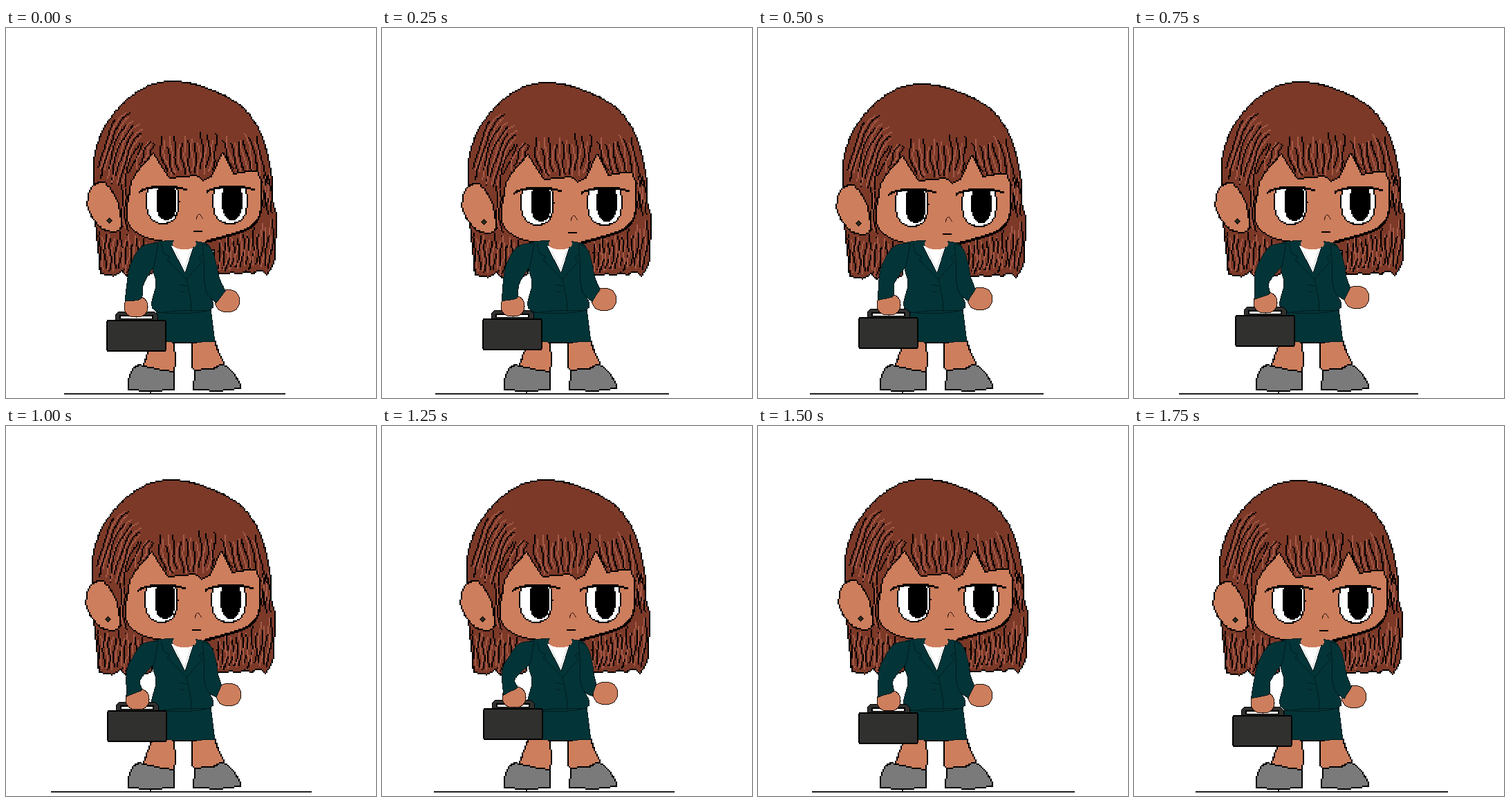
Recreate the animation shown at these times as an HTML page with a canvas. Size 535 by 535 pixels, loop 2 s.

```html
<!DOCTYPE html>
<html lang="en">
<head>
<meta charset="utf-8">
<title>Office walk</title>
<style>
  html, body { margin: 0; width: 100%; height: 100%; overflow: hidden; background: #fff; }
  canvas { display: block; width: 100vw; height: 100vh; image-rendering: pixelated; }
</style>
</head>
<body>
<canvas id="stage" width="535" height="535"></canvas>
<script>
const SIZE = 535, STEP = 250, STEPS = 8, PEAK = 5;
const SKIN = '#cd7e5d', HAIR = '#7c3928', SHINE = '#a65a48', SUIT = '#033437', SEAM = '#011c1f',
      SHOE = '#7a7a7a', BAG = '#30302f', INK = '#000', KNUCKLE = '#1c0d07';
const FLOOR_LEFT = [84, 77, 75, 65, 65, 75, 78, 89];
const FLOOR_RIGHT = [404, 415, 413, 411, 442, 423, 458, 454];

const stage = document.getElementById('stage').getContext('2d');
let g = stage, cell = 1;

const lerp = (a, b, t) => a + (b - a) * t;
const shift = (pts, [dx, dy]) => pts.map(([x, y]) => [x + dx, y + dy]);

let seed = 7;
function random() {
  seed = (seed * 16807) % 2147483647;
  return seed / 2147483647;
}

function pairs(flat) {
  const out = [];
  for (let i = 0; i < flat.length; i += 2) out.push([flat[i], flat[i + 1]]);
  return out;
}

// Catmull-Rom curve through the points
function curve(flat, closed = false) {
  const p = pairs(flat), n = p.length, out = [];
  const at = i => closed ? p[(i + n) % n] : p[Math.max(0, Math.min(n - 1, i))];
  for (let i = 0; i < (closed ? n : n - 1); i++) {
    const [a, b, c, d] = [at(i - 1), at(i), at(i + 1), at(i + 2)];
    for (let t = 0; t < 1; t += 0.125) {
      out.push([0, 1].map(k => b[k] + 0.5 * t * (c[k] - a[k] +
        t * (2 * a[k] - 5 * b[k] + 4 * c[k] - d[k] + t * (3 * (b[k] - c[k]) + d[k] - a[k])))));
    }
  }
  if (!closed) out.push(p[n - 1]);
  return out;
}

// Rounded blob, optionally cut flat at the top
function blob(cx, cy, rx, ry, top = 0) {
  const bulge = v => Math.sign(v) * Math.abs(v) ** 0.85;
  return Array.from({ length: 32 }, (_, i) => {
    const a = i * Math.PI / 16;
    return [cx + rx * bulge(Math.cos(a)), Math.max(top, cy + ry * bulge(Math.sin(a)))];
  });
}

// Hard-edged polygon fill, row by row
function fill(pts, color) {
  g.fillStyle = color;
  for (let y = 0; y * cell < SIZE; y++) {
    const row = (y + 0.5) * cell, hits = [];
    pts.forEach(([x1, y1], i) => {
      const [x2, y2] = pts[(i + 1) % pts.length];
      if ((y1 <= row) !== (y2 <= row)) hits.push(x1 + (row - y1) / (y2 - y1) * (x2 - x1));
    });
    hits.sort((a, b) => a - b);
    for (let i = 0; i + 1 < hits.length; i += 2) {
      const a = Math.round(hits[i] / cell), b = Math.round(hits[i + 1] / cell);
      g.fillRect(a * cell, y * cell, (b - a) * cell, cell);
    }
  }
}

function line(pts, color = INK, closed = false, thick = 1) {
  g.fillStyle = color;
  const n = pts.length;
  for (let i = 0; i < (closed ? n : n - 1); i++) {
    const [x1, y1] = pts[i], [x2, y2] = pts[(i + 1) % n];
    const count = Math.max(1, Math.ceil(Math.max(Math.abs(x2 - x1), Math.abs(y2 - y1)) / cell));
    for (let k = 0; k <= count; k++) {
      const x = Math.floor(lerp(x1, x2, k / count) / cell);
      const y = Math.floor(lerp(y1, y2, k / count) / cell);
      g.fillRect(x * cell, y * cell, cell, cell * thick);
    }
  }
}

function shape(pts, color, edge = INK) {
  fill(pts, color);
  line(pts, edge, true);
}

// Ragged hair ends between two x positions
function ragged(x1, x2, y) {
  const n = Math.round(Math.abs(x2 - x1) / 6);
  return Array.from({ length: n + 1 }, (_, i) => [lerp(x1, x2, i / n), y + (random() - 0.5) * 8]);
}

// Wavy dark and light strands spread between two guide strands
function strands(n, first, last) {
  const from = pairs(first), to = pairs(last);
  for (let i = 0; i <= 2 * n; i++) {
    const u = i / (2 * n);
    const [a, m, b] = from.map((p, k) => [lerp(p[0], to[k][0], u), lerp(p[1], to[k][1], u)]);
    const start = random() * 0.3, end = 1 - random() * 0.15, phase = random() * 6;
    const pts = Array.from({ length: 9 }, (_, k) => {
      const t = lerp(start, end, k / 8), s = 1 - t;
      return [0, 1].map(j => s * s * a[j] + 2 * s * t * m[j] + t * t * b[j] +
        (j ? 0 : 1.6 * Math.sin(phase + t * 9)));
    });
    line(pts, i % 2 ? SHINE : INK);
  }
}

function drawEye(cx, rx, look) {
  shape(blob(cx, 250, rx, 33, 231), '#fff');
  fill(blob(cx + look, 250, 15, 28, 229), INK);
  line(curve([cx - 33, 236, cx - 22, 231, cx, 229, cx + 22, 230, cx + 34, 233]), INK, false, 1.5);
}

function makeHead() {
  const layer = document.createElement('canvas');
  layer.width = layer.height = SIZE;
  g = layer.getContext('2d');
  cell = 2;

  const crown = curve([131, 300, 126, 228, 131, 172, 155, 125, 195, 89, 240, 77, 290, 87,
    340, 113, 370, 156, 384, 215, 386, 252, 391, 275, 388, 335]);
  shape([...crown, ...ragged(383, 303, 353), [300, 320], [213, 320], ...ragged(213, 137, 355)], HAIR);

  strands(6, [176, 114, 142, 140, 131, 222], [206, 154, 178, 172, 170, 238]);
  strands(2, [208, 156, 184, 186, 178, 215], [215, 165, 210, 175, 208, 186]);
  strands(8, [224, 156, 220, 185, 236, 214], [302, 150, 308, 180, 296, 210]);
  strands(5, [312, 148, 314, 180, 332, 208], [358, 148, 374, 180, 376, 262]);
  strands(2, [374, 190, 372, 230, 374, 270], [381, 205, 381, 230, 386, 270]);
  strands(9, [136, 292, 134, 320, 138, 355], [205, 300, 212, 325, 194, 354]);
  strands(11, [306, 308, 314, 325, 304, 352], [388, 268, 386, 310, 380, 350]);
  strands(1, [168, 222, 168, 260, 168, 298], [174, 230, 170, 260, 175, 296]);

  const jaw = curve([289, 310, 335, 297, 359, 285, 369, 265]);
  const cheek = curve([213, 181, 186, 213, 178, 240, 176, 280, 200, 302, 245, 311]);
  const fringe = pairs([370, 222, 364, 208, 350, 207, 329, 211, 313, 180, 297, 215, 285, 220,
    275, 213, 236, 217]);
  shape([...cheek, ...jaw, ...fringe], SKIN);
  line(shift(jaw, [0, -2]), INK, false, 2);

  shape(curve([139, 223, 122, 233, 119, 262, 139, 290, 165, 291, 163, 257, 152, 234], true), SKIN);
  drawEye(226.5, 23.5, 5.5);
  drawEye(324, 25, 3);

  cell = 1;
  line(curve([275, 276, 279, 269, 284, 275]), '#3a1c12');
  shape(pairs([149, 274, 153, 278, 149, 282, 145, 278]), '#2a2a1c');
  g.fillStyle = INK;
  g.fillRect(271, 293, 13, 2);
  return layer;
}

function drawLegs() {
  cell = 2;
  shape(curve([212, 452, 203, 476, 202, 494, 241, 497, 243, 454]), SKIN);
  shape(curve([270, 454, 272, 494, 313, 490, 307, 468, 301, 452]), SKIN);
  shape([...curve([243, 497, 222, 494, 205, 490, 190, 488, 181, 498, 176, 515]),
    ...pairs([176, 522, 208, 526, 243, 522])], SHOE);
  shape([...curve([273, 495, 300, 492, 313, 487, 328, 498, 338, 514]),
    ...pairs([338, 521, 305, 525, 271, 522])], SHOE);
  line(pairs([217, 453, 262, 455, 302, 452]));
  cell = 1;
}

function drawSuit() {
  shape(pairs([217, 408, 296, 406, 302, 453, 262, 455, 217, 453]), SUIT, SEAM);
  shape(curve([213, 311, 212, 345, 217, 370, 216, 409, 296, 407, 288, 372, 291, 345, 290, 312], true), SUIT, SEAM);

  // Shirt and neck
  fill(pairs([239, 315, 259, 354, 271, 315]), '#fff');
  line(pairs([245, 322, 258, 347, 267, 321]), '#d7dadd');
  fill(blob(258, 312, 17, 8), SKIN);

  // Lapels, front edge, buttons and hem
  const seams = [
    [224, 311, 228, 326, 236, 330, 233, 336, 261, 363, 284, 337, 279, 331, 287, 326, 291, 312],
    [238, 315, 259, 354, 271, 316], [261, 363, 267, 393, 267, 409],
    [251, 371, 260, 373], [252, 380, 258, 382], [217, 412, 258, 408, 296, 408]
  ];
  seams.forEach(seam => line(pairs(seam), SEAM));
}

function drawFreeArm([dx, dy]) {
  shape(shift(blob(320, 394.5, 17.5, 16), [dx, dy]), SKIN, KNUCKLE);
  shape([
    ...curve([284, 312, 297, 320, 304, 342, 308 + dy * 0.2, 360, 317 + dy * 0.9, 380 + dy * 0.9]),
    ...curve([304, 397 + dy * 0.8, 292, 386 + dy * 0.3, 287, 368, 287, 345])
  ], SUIT, SEAM);
}

function drawBag(move) {
  const box = (x, y, w, h, color) => {
    g.fillStyle = color;
    g.fillRect(x + move[0], y + move[1], w, h);
  };
  shape(shift(pairs([158, 424, 158, 414, 163, 410, 214, 410, 219, 415, 219, 424]), move), BAG);
  box(164, 415, 49, 6, INK);
  box(166, 417, 45, 3, '#fff');
  box(146, 422, 85, 46, INK);
  box(145, 424, 87, 42, INK);
  box(147, 424, 83, 42, BAG);
}

function drawBagArm([dx, dy]) {
  shape(shift(blob(188, 403, 17, 15), [dx, dy]), SKIN, KNUCKLE);
  shape([
    ...curve([220, 311, 198, 315, 184, 333, 177 + dy * 0.3, 355, 172 + dx * 1.3, 395 + dy * 0.5]),
    ...curve([185 + dx * 0.6, 394 + dy, 196, 390 + dy * 1.1, 199 + dy * 0.6, 370 + dy * 0.4, 214, 344])
  ], SUIT, SEAM);
}

// The arms rise slowly to the peak, then swing back outwards and down
function poseAt(step) {
  const lift = step <= PEAK ? step / PEAK : (STEPS - step) / (STEPS - PEAK);
  const swing = 0.75 * Math.max(0, step - PEAK) ** 2;
  const beat = step % 3, bar = Math.floor(step / 3);
  const arm = (x, y, ease) => [Math.round(x * lift - swing), Math.round(-y * lift ** ease)];
  return {
    head: [-2 * beat - (bar > 1 ? 1 : 0), bar === 1 ? 1 : 2 * beat],
    fist: arm(3, 8, 1),
    grip: arm(3, 11, 1.3),
    bag: arm(1.2, 14, 1.25)
  };
}

const head = makeHead();

function draw(step) {
  const pose = poseAt(step);
  g = stage;
  cell = 1;
  g.fillStyle = '#fff';
  g.fillRect(0, 0, SIZE, SIZE);
  g.fillStyle = '#202020';
  g.fillRect(FLOOR_LEFT[step], 528, FLOOR_RIGHT[step] - FLOOR_LEFT[step], 2);
  g.drawImage(head, ...pose.head);
  drawLegs();
  drawSuit();
  drawFreeArm(pose.fist);
  drawBag(pose.bag);
  drawBagArm(pose.grip);
}

const begin = performance.now();
let shown = -1;
function tick() {
  const step = Math.floor((performance.now() - begin) / STEP) % STEPS;
  if (step !== shown) draw(shown = step);
  requestAnimationFrame(tick);
}
tick();
</script>
</body>
</html>
```
